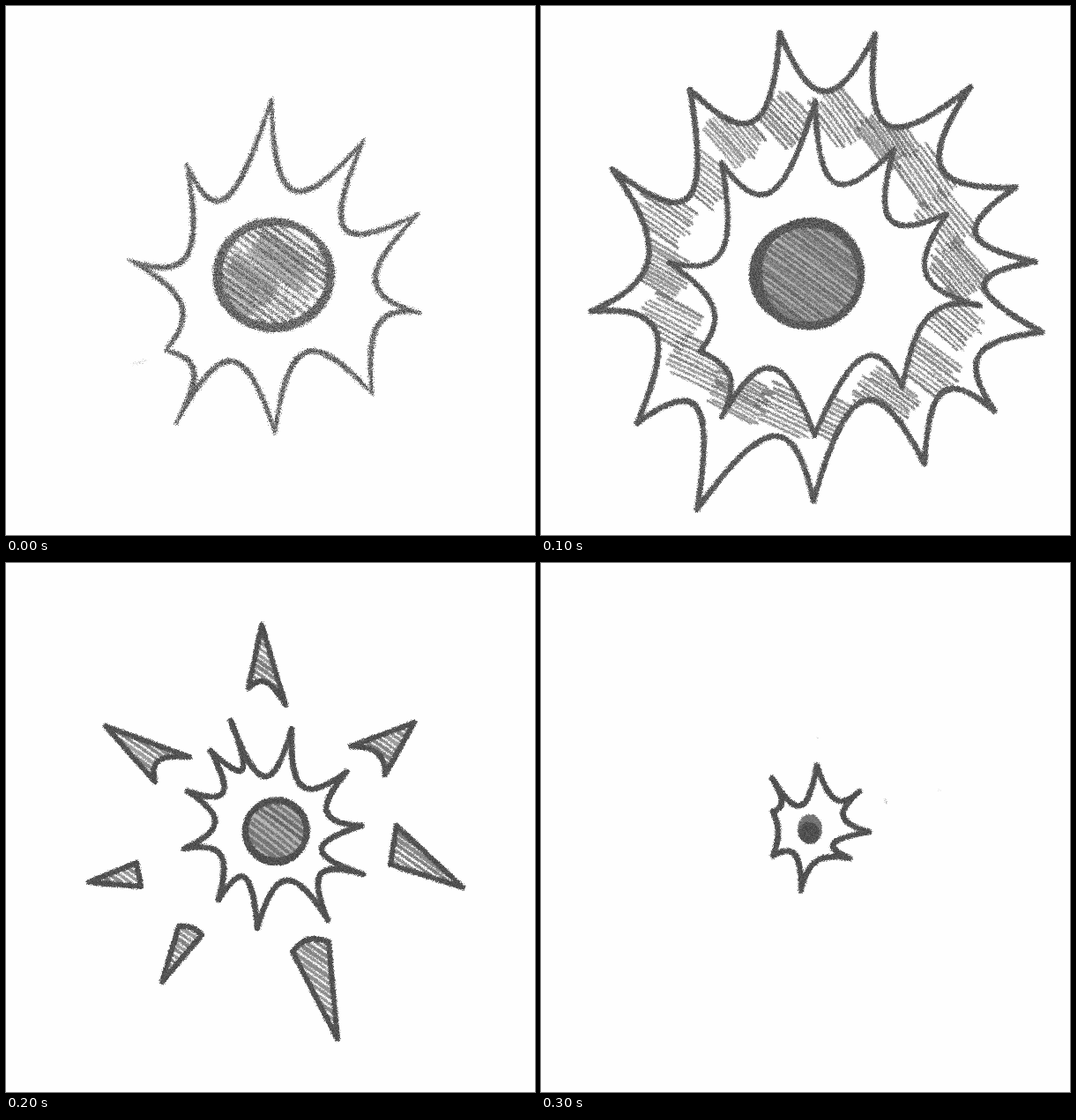
These frames come from a looping animation (600 by 600 pixels, 400 ms). An HTML page with a canvas:

```html
<!DOCTYPE html>
<html lang="en">
<head>
<meta charset="utf-8">
<title>Pencil burst</title>
<style>
html, body { margin: 0; width: 100%; height: 100%; overflow: hidden; background: #fff; }
canvas { display: block; width: 600px; height: 600px; }
</style>
</head>
<body>
<canvas id="stage" width="600" height="600"></canvas>
<script>
const SIZE = 600, HOLD = 100, INK = '#3e3e3e';
let seed = 7;
const rand = () => (seed = seed * 16807 % 2147483647) / 2147483647;
const spread = n => (rand() * 2 - 1) * n;

// Each row is a tip and the deepest point of the scallop that follows it.
const burst = [
  [205, 180, 250, 217], [301, 106, 326, 209], [406, 152, 384, 252], [468, 236, 419, 310],
  [470, 348, 422, 362], [415, 440, 340, 393], [305, 484, 256, 403], [193, 473, 213, 415],
  [181, 391, 198, 337], [139, 288, 205, 283]
];

const flameOut = [
  [271, 31, 322, 97], [379, 32, 393, 135], [487, 92, 454, 183], [538, 206, 493, 258],
  [560, 290, 503, 318], [568, 370, 497, 396], [514, 459, 456, 438], [435, 519, 366, 448],
  [309, 561, 264, 488], [177, 571, 177, 456], [109, 473, 130, 369], [57, 346, 122, 285],
  [81, 185, 167, 217], [169, 95, 242, 130]
];

const flameIn = [
  [311, 108, 333, 200], [400, 163, 396, 242], [460, 236, 437, 304], [498, 340, 440, 352],
  [410, 432, 365, 399], [310, 487, 262, 411], [205, 466, 214, 420], [180, 392, 195, 342],
  [145, 291, 205, 278], [205, 178, 262, 210]
];

const smallBurst = [
  [255, 179, 293, 242], [324, 188, 336, 253], [386, 237, 364, 282], [403, 298, 358, 325],
  [405, 353, 357, 353], [365, 405, 318, 360], [285, 414, 271, 357], [241, 382, 243, 331],
  [202, 324, 237, 294], [206, 259, 246, 260], [232, 213, 268, 234]
];

const seedling = [
  [313, 230, 334, 268], [361, 259, 343, 287], [372, 305, 332, 318], [350, 335, 313, 338],
  [295, 371, 288, 331], [263, 332, 269, 306], [263, 282, 273, 270], [262, 244, 294, 275]
];

// Apex, two base corners, and how far the base bends towards the apex.
const shards = [
  [290, 70, 317, 161, 275, 142, 0.2], [463, 181, 430, 240, 391, 208, 0.2],
  [518, 368, 443, 298, 436, 342, 0], [376, 540, 325, 441, 366, 430, -0.08],
  [177, 475, 196, 412, 222, 422, -0.06], [94, 362, 148, 340, 153, 367, 0],
  [113, 185, 208, 220, 169, 248, 0.2]
];

const mix = (a, b, t) => a + (b - a) * t;

// A cubic from a to b whose middle lies on m.
function scallop(a, m, b) {
  const pull = 0.75, steps = 28, pts = [];
  const peak = [0, 1].map(n => (m[n] - 0.21875 * (a[n] + b[n])) / 0.5625);
  for (let i = 0; i <= steps; i++) {
    const t = i / steps, u = 1 - t;
    pts.push([0, 1].map(n =>
      u ** 3 * a[n] + 3 * u * u * t * mix(a[n], peak[n], pull) +
      3 * u * t * t * mix(b[n], peak[n], pull) + t ** 3 * b[n]));
  }
  return pts;
}

const star = rows => rows.map((row, i) =>
  scallop(row.slice(0, 2), row.slice(2), rows[(i + 1) % rows.length].slice(0, 2)));

function shard([ax, ay, bx, by, cx, cy, bend]) {
  const a = [ax, ay], b = [bx, by], c = [cx, cy];
  const middle = (p, q) => [(p[0] + q[0]) / 2, (p[1] + q[1]) / 2];
  const base = middle(b, c);
  const dent = [mix(base[0], ax, bend), mix(base[1], ay, bend)];
  return [scallop(a, middle(a, b), b), scallop(b, dent, c), scallop(c, middle(c, a), a)];
}

function area(...shapes) {
  const path = new Path2D();
  for (const arcs of shapes) {
    arcs.flat().forEach(([x, y], i) => i ? path.lineTo(x, y) : path.moveTo(x, y));
    path.closePath();
  }
  return path;
}

function oval(x, y, rx, ry) {
  const path = new Path2D();
  path.ellipse(x, y, rx, ry, 0, 0, Math.PI * 2);
  return path;
}

function outline(g, arcs, width, taper = 0) {
  for (const pts of arcs) {
    for (let i = 1; i < pts.length; i++) {
      const end = Math.abs(2 * (i - 0.5) / (pts.length - 1) - 1);
      g.lineWidth = width * (1 - taper * end ** 5) + spread(0.4);
      g.beginPath();
      g.moveTo(...pts[i - 1]);
      g.lineTo(...pts[i]);
      g.stroke();
    }
  }
}

function ring(g, x, y, rx, ry, width, wobble) {
  g.lineWidth = width;
  for (let i = 0; i < 3; i++) {
    g.stroke(oval(x + spread(wobble), y + spread(wobble), rx + spread(wobble), ry + spread(wobble)));
  }
}

function hatch(g, x, y, length, depth, angle, gap, alpha = 0.75, width = 3) {
  g.save();
  g.translate(x, y);
  g.rotate(angle * Math.PI / 180);
  for (let d = -depth / 2; d <= depth / 2; d += gap) {
    const half = length / 2 * Math.sqrt(1 - (d / depth) ** 2);
    g.globalAlpha = alpha * (0.8 + rand() * 0.3);
    g.lineWidth = width * (0.7 + rand() * 0.5);
    g.beginPath();
    g.moveTo(-half + spread(length * 0.09), d + spread(1));
    g.quadraticCurveTo(0, d - 1, half + spread(length * 0.09), d + spread(1));
    g.stroke();
  }
  g.restore();
}

// Patches of shading spaced around the flame.
function shadeFlame(g) {
  const count = 18;
  for (let i = 0; i < count; i++) {
    const turn = i / count * Math.PI * 2;
    const r = 170 + spread(10);
    const angle = 40 + 15 * Math.cos(turn + 0.9) + spread(4);
    const x = 306 + r * Math.cos(turn), y = 300 + r * Math.sin(turn);
    hatch(g, x, y, 62, 48, angle, i % 3 ? 5.5 : 4.5);
  }
}

function inside(g, path, draw) {
  g.save();
  g.clip(path, 'evenodd');
  draw();
  g.restore();
}

// Roughens edges and thins the ink at random, like pencil on paper.
function grain(g, rough, fade) {
  const image = g.getImageData(0, 0, SIZE, SIZE), px = image.data;
  const ink = px.slice();
  for (let y = 4; y < SIZE - 4; y++) {
    for (let x = 4; x < SIZE - 4; x++) {
      const sx = x + Math.round(spread(rough)), sy = y + Math.round(spread(rough));
      const from = (sy * SIZE + sx) * 4, to = (y * SIZE + x) * 4;
      const alpha = (ink[from + 3] * 0.7 + ink[to + 3] * 0.3) * (1 - fade * rand());
      px[to] = px[to + 1] = px[to + 2] = 62;
      px[to + 3] = alpha;
    }
  }
  g.putImageData(image, 0, 0);
}

function sheet(rough, fade, draw) {
  const canvas = document.createElement('canvas');
  canvas.width = canvas.height = SIZE;
  const g = canvas.getContext('2d', { willReadFrequently: true });
  g.strokeStyle = g.fillStyle = INK;
  g.lineCap = g.lineJoin = 'round';
  draw(g);
  grain(g, rough, fade);
  return canvas;
}

function faintLine(g, x1, y1, x2, y2, alpha) {
  g.globalAlpha = alpha;
  g.lineWidth = 1;
  g.beginPath();
  g.moveTo(x1, y1);
  g.lineTo(x2, y2);
  g.stroke();
}

const sheets = [
  sheet(2, 0.45, g => {
    outline(g, star(burst), 6, 0.5);
    inside(g, oval(304, 305, 62, 58), () => {
      hatch(g, 297, 304, 122, 104, 36, 7, 0.85, 4);
      hatch(g, 311, 291, 68, 34, 36, 3, 0.5, 4);
      hatch(g, 270, 318, 60, 50, 36, 5, 0.6, 4);
    });
    ring(g, 304, 305, 64, 60, 7, 2);
    g.lineWidth = 10;
    g.beginPath();
    g.ellipse(304, 305, 64, 60, 0, -0.6, 3.9);
    g.stroke();
    faintLine(g, 144, 406, 160, 402, 0.4);
  }),
  sheet(1.5, 0.3, g => {
    const outer = star(flameOut), inner = star(flameIn);
    inside(g, area(outer, inner), () => shadeFlame(g));
    outline(g, outer, 6.5);
    outline(g, inner, 6);
    inside(g, oval(304, 305, 59, 57), () => {
      g.globalAlpha = 0.45;
      g.fill(oval(304, 307, 56, 55));
      hatch(g, 304, 305, 120, 112, 36, 6, 0.75, 4.5);
    });
    ring(g, 304, 304, 61, 59, 7, 3);
  }),
  sheet(1, 0.2, g => {
    g.globalAlpha = 0.9;
    outline(g, star(smallBurst), 6.5);
    for (const row of shards) {
      const arcs = shard(row);
      const x = (row[0] + row[2] + row[4]) / 3, y = (row[1] + row[3] + row[5]) / 3;
      inside(g, area(arcs), () => hatch(g, x, y, 120, 120, 35, 6, 0.7, 4.5));
      outline(g, arcs, 6);
    }
    inside(g, oval(306, 304, 32, 32), () => {
      g.globalAlpha = 0.4;
      g.fill(oval(306, 304, 32, 32));
      hatch(g, 306, 304, 66, 62, 38, 7, 0.75, 5);
    });
    g.globalAlpha = 1;
    ring(g, 306, 304, 34.5, 34.5, 6.5, 1.2);
  }),
  sheet(1, 0.2, g => {
    g.globalAlpha = 0.85;
    outline(g, star(seedling), 6.5);
    g.globalAlpha = 0.8;
    g.fill(oval(305, 302, 14, 17));
    g.globalAlpha = 1;
    g.fill(oval(304, 306, 12, 12));
    faintLine(g, 390, 268, 392, 273, 0.5);
    faintLine(g, 313, 198, 314, 199, 0.25);
    faintLine(g, 451, 257, 453, 258, 0.25);
  })
];

const stage = document.getElementById('stage').getContext('2d');
function play() {
  const step = Math.floor(performance.now() / HOLD) % sheets.length;
  stage.fillStyle = '#fefefe';
  stage.fillRect(0, 0, SIZE, SIZE);
  stage.drawImage(sheets[step], 0, 0);
  requestAnimationFrame(play);
}
play();
</script>
</body>
</html>
```
